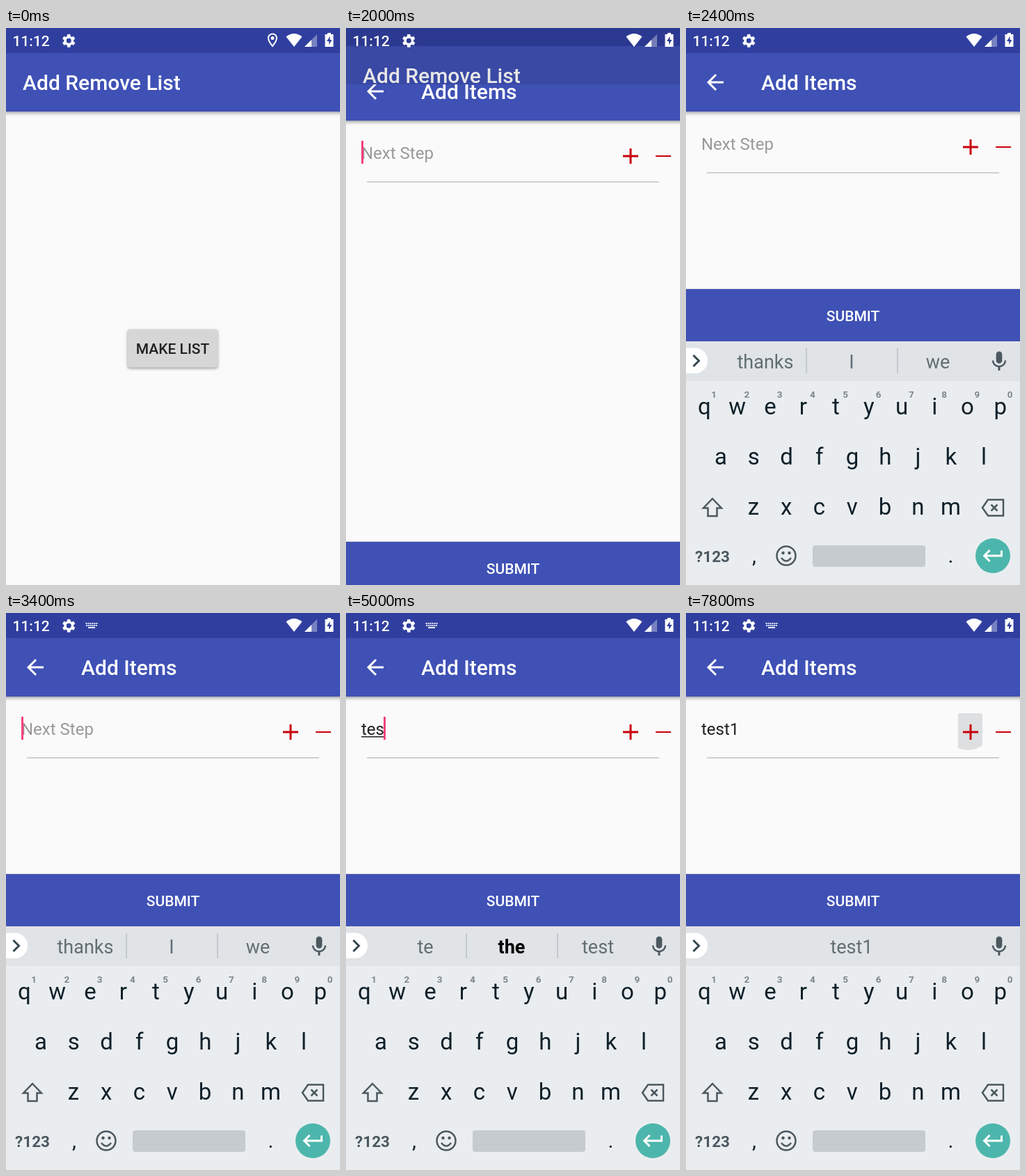
Animation, 480 px wide and 800 px high, one loop 8000 ms. Source, as an HTML page with a canvas:

```html
<!DOCTYPE html>
<html lang="en">
<head>
<meta charset="utf-8">
<title>Add Remove List</title>
<style>
html, body { margin: 0; width: 100%; height: 100%; overflow: hidden; background: #fafafa; }
canvas { display: block; }
</style>
</head>
<body>
<canvas id="stage" width="480" height="800"></canvas>
<script>
const g = document.getElementById('stage').getContext('2d');
const LOOP = 8000, STEP = 200;
const BLUE = '#3f51b5', DARK = '#303f9f', PAGE = '#fafafa', INK = '#212121', RED = '#c8000a';

const ICONS = {
  back: 'M20 11H7.83l5.59-5.59L12 4l-8 8 8 8 1.41-1.41L7.83 13H20z',
  gear: 'M19.4 13c.1-.7.1-1.300 0-2l2.100-1.600-2-3.500-2.500 1a7 7 0 0 0-1.700-1L15 3.200h-4l-.4 2.700a7 7 0 0 0-1.700 1l-2.500-1-2 3.500L6.500 11a7 7 0 0 0 0 2l-2.100 1.600 2 3.500 2.500-1a7 7 0 0 0 1.700 1l.4 2.700h4l.4-2.700a7 7 0 0 0 1.700-1l2.500 1 2-3.500zM13 15.300a3.300 3.300 0 1 1 0-6.600 3.300 3.300 0 0 1 0 6.600z',
  pin: 'M12 2C8.130 2 5 5.130 5 9c0 5.250 7 13 7 13s7-7.750 7-13c0-3.870-3.130-7-7-7zM7 9a5 5 0 0 1 10 0c0 2.880-2.880 7.190-5 9.880C9.920 16.210 7 11.850 7 9zM9.500 9a2.500 2.500 0 1 0 5 0 2.500 2.500 0 1 0-5 0z',
  wifi: 'M11.500 19 0 4.500Q11.500-4.500 23 4.500z',
  battery: 'M3.500 0h5v2H12v18H0V2h3.500zM7 5 2.500 12H5.500v5L10 10H7z',
  mic: 'M12 14a3 3 0 0 0 3-3V5a3 3 0 0 0-6 0v6a3 3 0 0 0 3 3zm5.300-3c0 3-2.540 5.100-5.300 5.100S6.700 14 6.700 11H5c0 3.410 2.720 6.230 6 6.720V21h2v-3.280c3.280-.480 6-3.300 6-6.720z',
  enter: 'M19 7v4H5.830l3.580-3.590L8 6l-6 6 6 6 1.410-1.410L5.830 13H21V7z'
};

function rect(x, y, w, h, color, r = 0) {
  g.fillStyle = color;
  g.beginPath();
  g.roundRect(x, y, w, h, r);
  g.fill();
}

function disc(x, y, r, color) {
  g.fillStyle = color;
  g.beginPath();
  g.arc(x, y, r, 0, 7);
  g.fill();
}

function text(s, x, y, size, color, weight = 400, align = 'center') {
  g.font = `${weight} ${size}px Roboto, sans-serif`;
  g.textAlign = align;
  g.fillStyle = color;
  g.fillText(s, x, y);
}

function icon(name, x, y, scale, color) {
  g.save();
  g.translate(x, y);
  g.scale(scale, scale);
  g.fillStyle = color;
  g.fill(new Path2D(ICONS[name]), 'evenodd');
  g.restore();
}

function line(path, width, color) {
  g.lineWidth = width;
  g.strokeStyle = color;
  g.stroke(new Path2D(path));
}

function shadow(blur, dy, alpha, draw) {
  g.save();
  g.shadowColor = `rgba(0,0,0,${alpha})`;
  g.shadowBlur = blur;
  g.shadowOffsetY = dy;
  draw();
  g.restore();
}

function clipped(x, y, w, h, r, draw) {
  g.save();
  g.beginPath();
  g.roundRect(x, y, w, h, r);
  g.clip();
  draw();
  g.restore();
}

function header(title, x) {
  rect(0, 0, 480, 850, PAGE);
  shadow(5, 2, .4, () => rect(-10, 20, 500, 100, BLUE));
  rect(0, 0, 480, 36, DARK);
  text(title, x, 89, 30, '#fff', 500, 'left');
}

function home(t) {
  header('Add Remove List', 24);
  const pressed = t >= 1600;
  shadow(pressed ? 8 : 4, pressed ? 3 : 1.5, .4, () => rect(175, 433, 129, 54.5, '#d6d6d6', 3));
  if (pressed) clipped(175, 433, 129, 54.5, 3, () => disc(261, 460, t < 1800 ? 64 : 100, '#b9bbbc'));
  text('MAKE LIST', 239.5, 468, 21, INK, 500);
}

const typed = t => t < 4800 ? '' : t < 5000 ? 'te' : t < 5800 ? 'tes' : t < 6800 ? 'test' : 'test1';
const blinks = [2400, 3400, 4000, 4400, 4600, 4800, 7400];

function editor(t) {
  header('Add Items', 108);
  icon('back', 24, 60, 1.5, '#fff');

  const s = typed(t);
  text(s || 'Next Step', 22, 175, 24, s ? INK : '#999', 400, 'left');
  const w = s ? g.measureText(s).width : 0;
  if (s && t < 7800) rect(22, 177, w, 1.5, INK);
  if (blinks.filter(b => t >= b).length % 2 === 0) rect(Math.max(22, Math.round(21 + w)), 149, 3, 33, '#f4407f');
  rect(30, 207, 420, 2, '#d0d0d0');

  if (t >= 7800) clipped(391, 144, 35, 56, 3, () => disc(405, 162, 35, '#dedfe0'));
  line('M398 171h22M409 160v22', 3, RED);
  line('M445 171h22', 2, RED);

  const y = t < 2200 ? 725 : 375;
  rect(0, y - 1, 480, 1, '#dcdcdc');
  rect(0, y, 480, 75, BLUE);
  text('SUBMIT', 240, y + 46, 21, '#fff', 500);
}

function suggestions(t) {
  if (t < 4800) return ['thanks', 'I', 'we'];
  if (t < 5000) return ['t', 'the', 'thank'];
  if (t < 5400) return ['te', 'the', 'test'];
  if (t < 5800) return ['tes', 'test', 'yes'];
  if (t < 6400) return ['text', 'test', 'tests'];
  return ['', 'test1', ''];
}

function keyboard(t) {
  const gray = '#4b585f', key = '#0f2029';
  rect(0, 450, 480, 350, '#eaedf0');
  rect(0, 450, 480, 57, '#e0e4e7');
  rect(0, 459.500, 31, 36.500, '#fff', [0, 18, 18, 0]);
  line('M10.500 470l8 8-8 8', 3, '#37474f');

  const bold = t >= 4800 && t < 6400;
  suggestions(t).forEach((s, i) => {
    const strong = bold && i === 1;
    text(s, 114 + 124 * i, 489, 27, strong ? '#000' : '#626e74', strong ? 700 : 400);
  });
  if (t < 6400) for (const x of [172, 303]) rect(x, 460, 2, 36, '#c3c9cd');
  icon('mic', 432.600, 461.500, 1.450, gray);

  [['qwertyuiop', 26.500], ['asdfghjkl', 50], ['zxcvbnm', 97]].forEach(([row, x], r) =>
    [...row].forEach((c, i) => text(c, x + 47.250 * i, 555 + 72 * r, 33, key)));
  for (let i = 0; i < 10; i++) text((i + 1) % 10, 40 + 47.300 * i, 531, 13.500, '#7c868b', 700);

  line('M38 676l13 13.500h-6.500v11.500h-13v-11.500H25z', 2.500, gray);
  line('M426 689l8-11.500h22v23h-22zM438.500 684.500l9 9m0-9l-9 9', 2.500, gray);
  text('?123', 38, 767, 22.500, gray, 700);
  text(',', 98, 768, 30, key);
  text('.', 380.500, 768, 30, key);
  line('M157.500 758a13.500 13.500 0 1 1-27 0a13.500 13.500 0 1 1 27 0M137 761q7 9 14 0', 2.500, gray);
  disc(139.500, 754, 2.200, gray);
  disc(148.500, 754, 2.200, gray);
  rect(182, 743, 162, 31, '#c6cbcf', 4);
  disc(441, 758, 25, '#4db6ac');
  icon('enter', 423.500, 740, 1.500, '#fff');
}

function statusIcons(t) {
  text('11:12', 9.500, 26, 21, '#fff', 500, 'left');
  icon('gear', 76.500, 5.600, 1.060, '#fff');
  if (t < 200) icon('pin', 371, 5.500, 1, '#fff');
  icon('wifi', 402.500, 8, 1, '#fff');
  g.fillStyle = 'rgba(255,255,255,.35)';
  g.fill(new Path2D('M429 27h18V9z'));
  g.fillStyle = '#fff';
  g.fill(new Path2D('M429 27h10V17z'));
  icon('battery', 458.500, 7, 1, '#fff');
  if (t >= 2600) {
    for (let i = 0; i < 6; i++) {
      rect(114.500 + 3 * i, 14, 2, 2, '#e8eaf6');
      rect(115 + 2.800 * i, 17, 2, 2, '#e8eaf6');
    }
    rect(118, 20, 10, 2, '#e8eaf6');
  }
}

function shifted(dy, draw) {
  g.save();
  g.translate(0, dy);
  draw();
  g.restore();
}

// Both pages slide up while the new one is revealed from the bottom.
function transition(t) {
  const [move, reveal] = t < 2000 ? [.05, .1] : [.6, .911];
  const inY = Math.round(33 * (1 - move)), top = Math.round(inY + 767 * (1 - reveal));
  shifted(Math.round(-16 * move), () => home(t));
  rect(0, 0, 480, 800, `rgba(0,0,0,${.16 * move})`);
  clipped(0, top, 480, 800 - top, 0, () => shifted(inY, () => editor(t)));
}

function draw(t) {
  if (t < 1800) home(t);
  else if (t < 2200) transition(t);
  else {
    editor(t);
    const sliding = t < 2400;
    shifted(sliding ? 29 : 0, () => {
      keyboard(t);
      if (sliding) rect(0, 450, 480, 350, 'rgba(250,250,250,.28)');
    });
  }
  statusIcons(t);
}

function frame(now) {
  draw(Math.floor(now % LOOP / STEP) * STEP);
  requestAnimationFrame(frame);
}
requestAnimationFrame(frame);
</script>
</body>
</html>
```
